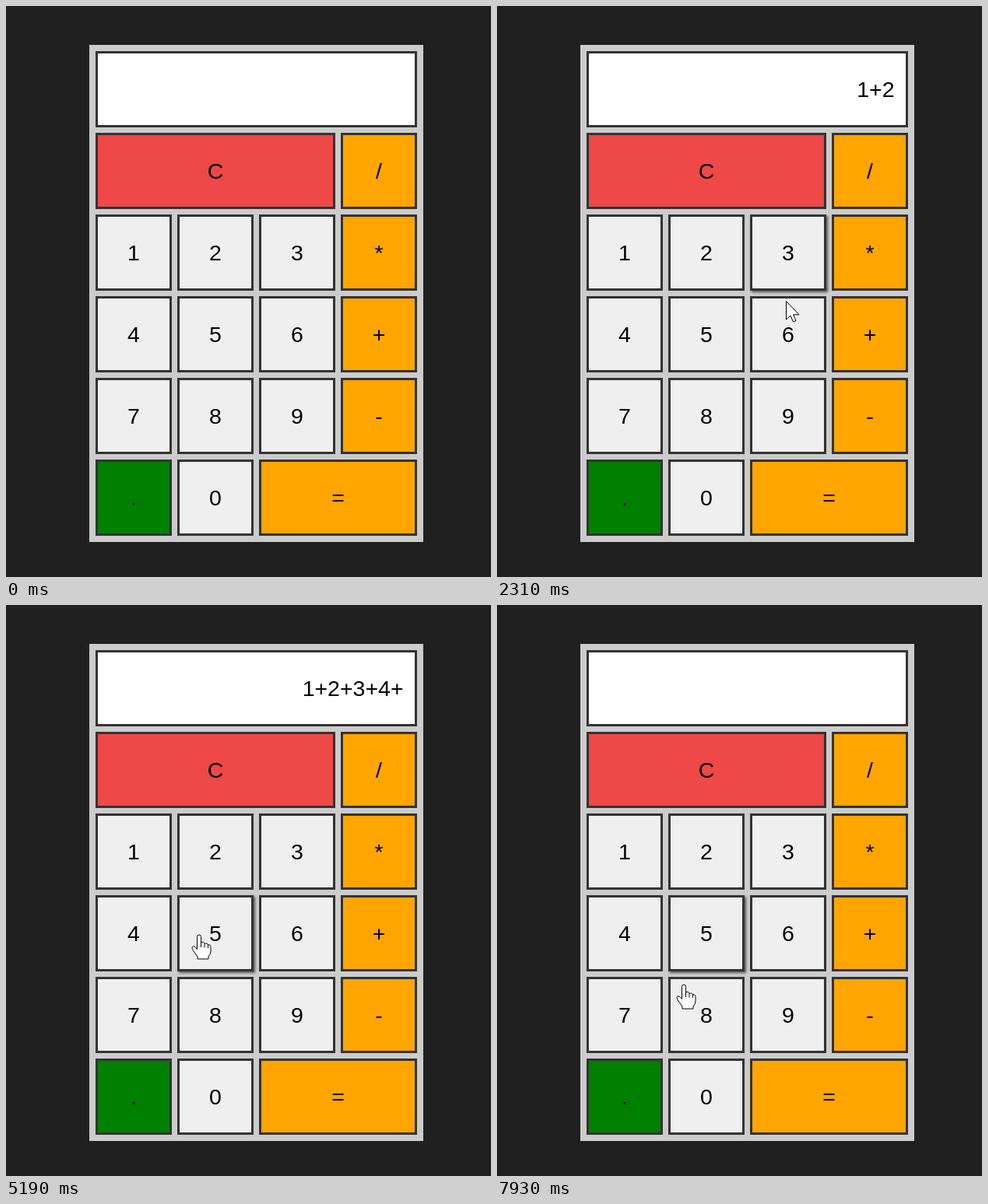
An HTML page for the animation above (8000 ms loop, 623 by 734 pixels).

```html
<!DOCTYPE html>
<html lang="en">
<head>
<meta charset="utf-8">
<title>Calculator</title>
<style>
  html, body { margin: 0; width: 100%; height: 100%; overflow: hidden; background: #202020; }
  #calc { position: absolute; left: 107px; top: 50px; width: 429px; height: 639px; background: #ccc; }
  #calc div {
    position: absolute; box-sizing: border-box; height: 98px; border: 3px solid #333;
    display: flex; align-items: center; justify-content: center;
    font: 28.5px "Liberation Sans", Arial, sans-serif; color: #000; white-space: pre;
  }
  #calc .screen { justify-content: flex-end; padding-right: 14.4px; }
  #calc .hover { box-shadow: 2px 2px 3px #555; }
  svg { position: absolute; left: 0; top: 0; width: 623px; height: 734px; }
  svg path { fill: #fff; stroke: #000; stroke-linejoin: round; }
</style>
</head>
<body>
<div id="calc"></div>
<svg viewBox="0 0 623 734">
  <g id="cursor">
    <path id="arrow" d="M.5 .5V24L6 19L9.500 27L13 25.500L9.700 17.800H17Z"/>
    <path id="hand" d="M-1.500 2.500Q-1.500 0 1 0T3.500 2.500V10Q7 8 8 11.500Q11.500 10 12.500 13Q16 12 16 16V21Q16 25 13 28V31H-1V28L-7 19.500Q-9 15.500 -6.500 14.800Q-4.500 14.500 -1.500 18.500ZM3.500 10V16M8 11.500V16.500M12.500 13V17"/>
  </g>
</svg>
<script>
const LOOP = 8000, ENTER = 270, LEAVE = 7780, LAST = 7930;
const LEAD = 160, LINGER = 40; // rest on a key before and after its click
const PRESSES = "1+2+3+4+5+6+7C";
const clicks = [890, 1540, 2180, 2560, 2990, 3550, 4180, 4700, 5320, 5700, 6080, 6456, 6956, 7400];

// Where the pointer rests, relative to the centre of a key
const aim = { 1: [14, -4], 2: [17, 12], 4: [30, -21], 5: [-22, 2], 7: [-3, -20], "+": [-25, 5], C: [-7, 20] };

const $ = id => document.getElementById(id);

function addBox(label, col, row, span, color) {
  const el = document.createElement("div");
  const x = 8 + col * 105, y = 8 + row * 105, w = span * 105 - 7;
  el.textContent = label;
  el.style.cssText = `left:${x}px;top:${y}px;width:${w}px;background:${color}`;
  $("calc").append(el);
  return { el, label, x: x + 107, y: y + 50, w };
}

const screen = addBox("", 0, 0, 4, "#fff").el;
screen.className = "screen";

const keys = [addBox("C", 0, 1, 3, "#ee4848")];
for (let n = 0; n < 9; n++)
  keys.push(addBox(`${n + 1}`, n % 3, 2 + Math.floor(n / 3), 1, "#efefef"));
[..."/*+-"].forEach((op, i) => keys.push(addBox(op, 3, i + 1, 1, "orange")));
keys.push(addBox(".", 0, 5, 1, "green"), addBox("0", 1, 5, 1, "#efefef"), addBox("=", 2, 5, 2, "orange"));

function restPoint(label) {
  const k = keys.find(k => k.label === label), [dx, dy] = aim[label] || [0, 5];
  return [k.x + k.w / 2 + dx, k.y + 49 + dy];
}

// Pointer stops: time, x, y
const stops = [[ENTER, 441, 318]];
clicks.forEach((time, i) => {
  const point = restPoint(PRESSES[i]);
  stops.push([time - LEAD, ...point], [time + LINGER, ...point]);
});
stops.push([LEAVE, ...restPoint("C")], [LEAVE + 300, 216, 744]);

function pointer(t) {
  const i = Math.max(1, stops.findIndex(s => s[0] > t));
  const [t0, x0, y0] = stops[i - 1], [t1, x1, y1] = stops[i];
  const u = Math.max(0, (t - t0) / (t1 - t0)), s = u * u * (3 - 2 * u);
  return [x0 + (x1 - x0) * s, y0 + (y1 - y0) * s];
}

function keyUnder(t) {
  if (t < ENTER) return;
  const [x, y] = pointer(t);
  return keys.find(k => x >= k.x && x < k.x + k.w && y >= k.y && y < k.y + 98);
}

function draw(t) {
  t = Math.min(t, LAST);
  const typed = PRESSES.slice(0, clicks.filter(c => c <= t).length);
  screen.textContent = typed.endsWith("C") ? "" : typed;

  // Hover and cursor shape trail slightly behind the pointer
  const hovered = keyUnder(t - 30), overKey = keyUnder(t - 10);
  for (const k of keys) k.el.classList.toggle("hover", k === hovered);

  $("cursor").setAttribute("transform", `translate(${pointer(t).map(Math.round)})`);
  $("cursor").style.display = t < ENTER ? "none" : "";
  $("hand").style.display = overKey ? "" : "none";
  $("arrow").style.display = overKey ? "none" : "";
}

const begin = performance.now();
function frame() {
  draw((performance.now() - begin) % LOOP);
  requestAnimationFrame(frame);
}
frame();
</script>
</body>
</html>
```
